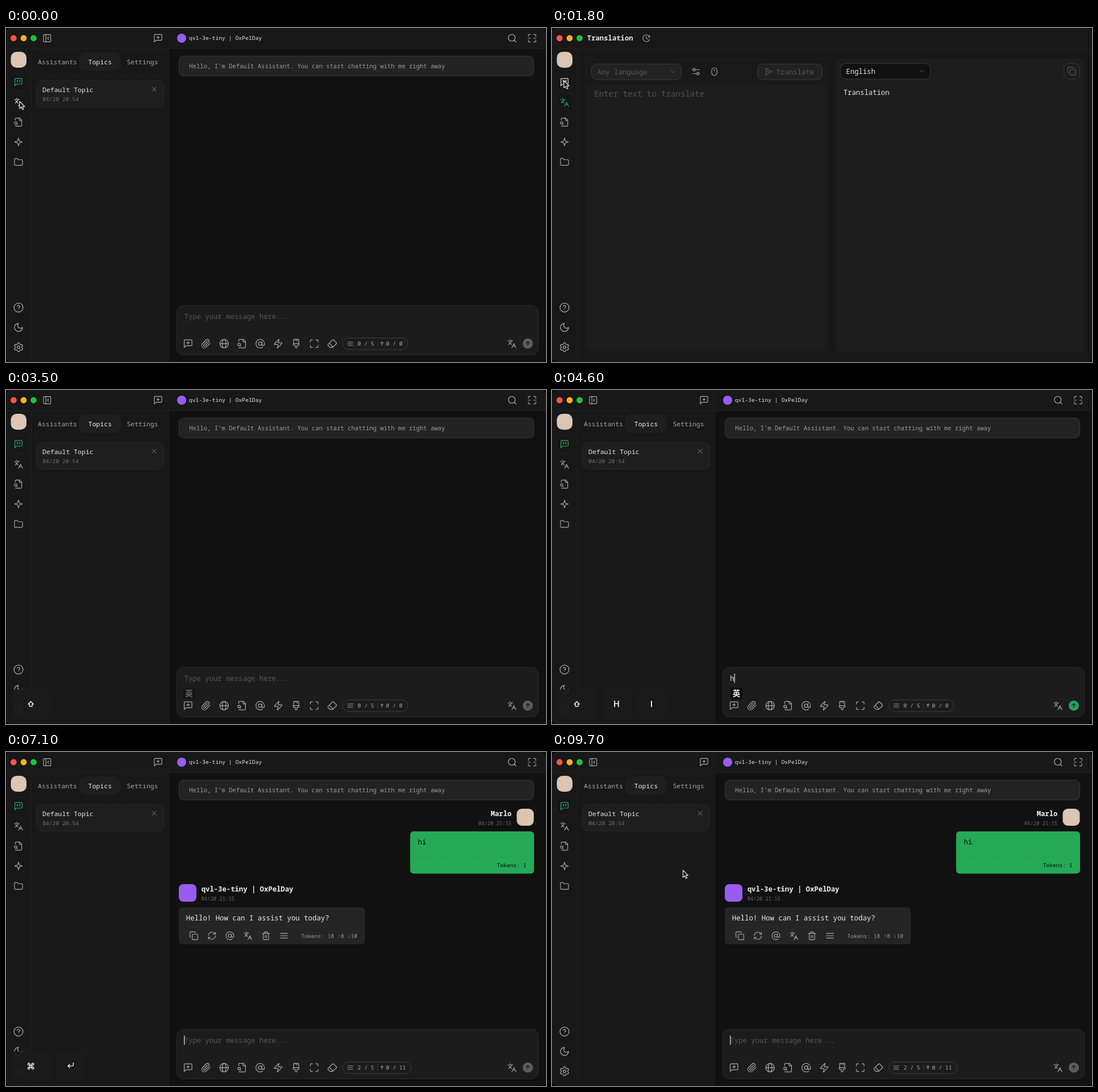
These frames come from a looping animation (950 by 589 pixels, 10000 ms). An HTML page:

```html
<!DOCTYPE html>
<html lang="en">
<head>
<meta charset="utf-8">
<title>Chat demo</title>
<style>
html, body { margin: 0; width: 100%; height: 100%; overflow: hidden; background: #0c0b0a; }
svg { display: block; width: 100vw; height: 100vh; }
text { font-family: "Noto Sans Mono", "DejaVu Sans Mono", monospace; white-space: pre; }
.key { font-family: Inter, Roboto, sans-serif; font-weight: 600; }
.cjk { font-family: "Noto Sans CJK SC", "Noto Sans CJK", sans-serif; font-weight: 700; }
</style>
</head>
<body>
<svg id="stage" viewBox="0 0 950 589" xmlns="http://www.w3.org/2000/svg"></svg>
<script>
const LOOP = 10000;
const MODEL = 'qvl-3e-tiny | OxPelDay';
const USER = 'Marlo';
const REPLY = ['Hello', '!', ' How', ' can', ' I', ' assist', ' you', ' today', '?'];
const GREEN = '#22b862', GREY = '#aaa', PURPLE = '#9a5cf0', SKIN = '#dcc5b3';

// Event times in ms
const AT = {
  translate: 100, chat: 2000, shift: 3000, badge: 3500, h: 4200, keyI: 4500, i: 4700,
  count: 4900, badgeOff: 5000, cmd: 5300, enter: 5400, send: 5500,
  reply: 6400, done: 7100, keysOff: 7600, mouse: 8600
};

const circle = (x, y, r) => `M${x - r} ${y}a${r} ${r} 0 1 1 ${2 * r} 0a${r} ${r} 0 1 1 ${-2 * r} 0`;

function gear() {
  let d = '';
  for (let a = 0; a < 360; a += 6) {
    const th = a * Math.PI / 180;
    const lobe = Math.max(-1, Math.min(1, 1.6 * Math.cos(6 * th)));
    const r = 8.6 - 1.3 * lobe;
    d += (a ? 'L' : 'M') + (12 + r * Math.cos(th)).toFixed(2) + ' ' + (12 + r * Math.sin(th)).toFixed(2);
  }
  return d + 'Z' + circle(12, 12, 3);
}

const bubble = 'M21 15a2 2 0 0 1-2 2H7l-4 4V5a2 2 0 0 1 2-2h14a2 2 0 0 1 2 2z';
const corners = 'M8 3H5a2 2 0 0 0-2 2v3M21 8V5a2 2 0 0 0-2-2h-3M3 16v3a2 2 0 0 0 2 2h3M16 21h3a2 2 0 0 0 2-2v-3';

// Line icons on a 24 unit grid
const ICONS = {
  quote: bubble + 'M8 12a2 2 0 0 0 2-2V8H8M14 12a2 2 0 0 0 2-2V8h-2',
  add: bubble + 'M12 7v6M9 10h6',
  lang: 'M5 8l6 6M4 14l6-6 2-3M2 5h12M7 2h1M22 22l-5-10-5 10M14 18h6',
  file: 'M14 2v4a2 2 0 0 0 2 2h4M4.3 21a2 2 0 0 0 1.7 1h12a2 2 0 0 0 2-2V7l-5-5H6a2 2 0 0 0-2 2v3M9 18l-1.5-1.5' + circle(5, 14, 3),
  spark: 'M12 2.5 14 9q.3.8 1 1l6.5 2-6.5 2q-.8.3-1 1l-2 6.5-2-6.5q-.3-.8-1-1l-6.5-2 6.5-2q.8-.3 1-1z',
  folder: 'M20 20a2 2 0 0 0 2-2V8a2 2 0 0 0-2-2h-7.9a2 2 0 0 1-1.7-.9l-.8-1.2A2 2 0 0 0 7.9 3H4a2 2 0 0 0-2 2v13a2 2 0 0 0 2 2z',
  help: circle(12, 12, 10) + 'M9 9a3 3 0 0 1 5.8 1c0 2-3 3-3 3M12 17h.01',
  moon: 'M12 3a6 6 0 0 0 9 9 9 9 0 1 1-9-9z',
  gear: gear(),
  panel: 'M5 3h14a2 2 0 0 1 2 2v14a2 2 0 0 1-2 2H5a2 2 0 0 1-2-2V5a2 2 0 0 1 2-2zM9 3v18M16 15l-3-3 3-3',
  search: circle(11, 11, 8) + 'M21 21l-4.3-4.3',
  wide: corners + 'M3 12h5M16 12h5',
  full: corners,
  clip: 'M21.4 11l-9.2 9.2a6 6 0 0 1-8.5-8.5l8.6-8.6A4 4 0 1 1 18 8.8l-8.6 8.6a2 2 0 0 1-2.8-2.8l8.5-8.5',
  globe: circle(12, 12, 10) + 'M2 12h20M12 2a4.4 10 0 0 0 0 20a4.4 10 0 0 0 0-20',
  at: circle(12, 12, 4) + 'M16 8v5a3 3 0 0 0 6 0v-1a10 10 0 1 0-4 8',
  zap: 'M4 14a1 1 0 0 1-.8-1.6l9.9-10.2a.5.5 0 0 1 .9.5l-2 6a1 1 0 0 0 1 1.3h7a1 1 0 0 1 .8 1.6l-9.9 10.2a.5.5 0 0 1-.9-.5l2-6a1 1 0 0 0-1-1.3z',
  brush: 'M10 2v2M14 2v4M17 2a1 1 0 0 1 1 1v9H6V3a1 1 0 0 1 1-1zM6 12a1 1 0 0 0-1 1v1a2 2 0 0 0 2 2h2a1 1 0 0 1 1 1v3a2 2 0 1 0 4 0v-3a1 1 0 0 1 1-1h2a2 2 0 0 0 2-2v-1a1 1 0 0 0-1-1',
  eraser: 'M7 21l-4.3-4.3c-1-1-1-2.5 0-3.4l9.6-9.6c1-1 2.5-1 3.4 0l5.6 5.6c1 1 1 2.5 0 3.4L13 21zM5 11l9 9',
  copy: 'M10 8h10a2 2 0 0 1 2 2v10a2 2 0 0 1-2 2H10a2 2 0 0 1-2-2V10a2 2 0 0 1 2-2zM4 16a2 2 0 0 1-2-2V4a2 2 0 0 1 2-2h10a2 2 0 0 1 2 2',
  refresh: 'M3 12a9 9 0 0 1 15-6.7L21 8M21 3v5h-5M21 12a9 9 0 0 1-15 6.7L3 16M3 21v-5h5',
  sync: 'M6 17.5A8 8 0 0 1 13 4M10.5 1.5 13.2 4l-2.7 2.8M18 6.5A8 8 0 0 1 11 20M13.5 17l-2.7 3 2.7 2.5',
  trash: 'M3 6h18M19 6v14a2 2 0 0 1-2 2H7a2 2 0 0 1-2-2V6M8 6V4a2 2 0 0 1 2-2h4a2 2 0 0 1 2 2v2M10 11v6M14 11v6',
  menu: 'M3 6h18M3 12h18M3 18h18',
  up: 'M12 19V5M6 11l6-6 6 6',
  close: 'M5 5l14 14M19 5L5 19',
  down: 'M5 8l7 8 7-8',
  history: 'M19.5 7.5A8.7 8.7 0 1 0 20 15.5M20.5 5.5v4h-3.5M12 7v5.5l4 2',
  sliders: 'M20 7h-9M14 17H5' + circle(17, 17, 3) + circle(7, 7, 3),
  mouse: 'M12 2a7 7 0 0 1 7 7v6a7 7 0 0 1-14 0V9a7 7 0 0 1 7-7zM12 6v4',
  plane: 'M4 3l17 9-17 9 3-9zM7 12h6',
  shift: 'M12 4l8 8h-4v7H8v-7H4z',
  cmd: 'M9 9h6v6H9zM9 9H6a3 3 0 1 1 3-3zM15 9V6a3 3 0 1 1 3 3zM15 15h3a3 3 0 1 1-3 3zM9 15v3a3 3 0 1 1-3-3z',
  enter: 'M20 5v6a3 3 0 0 1-3 3H4M9 9l-5 5 5 5'
};

const icon = (name, x, y, size = 18, color = GREY, w = 1.6, id = '') =>
  `<path ${id && `id="${id}"`} d="${ICONS[name]}" transform="translate(${x} ${y}) scale(${size / 24}) translate(-12 -12)"
    fill="none" stroke="${color}" stroke-width="${w}" stroke-linecap="round" stroke-linejoin="round"/>`;

// y is the middle of the capitals
const text = (x, y, size, color, str, more = '') =>
  `<text x="${x}" y="${(y + size * .357).toFixed(2)}" font-size="${size}" fill="${color}" ${more}>${str}</text>`;

const box = (x, y, x2, y2, r, fill, stroke = 'none', more = '') =>
  `<rect x="${x}" y="${y}" width="${x2 - x}" height="${y2 - y}" rx="${r}" fill="${fill}" stroke="${stroke}" ${more}/>`;

const line = (d, color, more = '') => `<path d="${d}" fill="none" stroke="${color}" ${more}/>`;
const dot = (x, y, r, fill, more = '') => `<circle cx="${x}" cy="${y}" r="${r}" fill="${fill}" ${more}/>`;
const group = (id, body) => `<g id="${id}">${body}</g>`;
const bold = 'font-weight="700"', medium = 'font-weight="500"';
const end = 'text-anchor="end"', mid = 'text-anchor="middle"';
const dash = 'stroke-dasharray="2 2"';

const nav = [['quote', 95.5], ['lang', 131], ['file', 166], ['spark', 201], ['folder', 236.5]];

const frame =
  box(0, 0, 950, 589, 9, '#181818') +
  line('M44.5 36V589', '#202020');

const sidebar =
  dot(13.3, 18, 5.4, '#ff5147') + dot(31, 18, 5.4, '#fdb024') + dot(48.5, 18, 5.4, '#20c43c') +
  box(8.5, 42, 36, 70, 10, SKIN) +
  box(7.5, 116, 37, 146, 8, '#161616', '#1f1f1f', 'id="navbox"') +
  nav.map(([name, y], i) => icon(name, 22, y, 17, GREY, 1.6, 'nav' + i)).join('') +
  icon('help', 22, 493, 19) + icon('moon', 22, 528, 19) + icon('gear', 22, 563, 19);

const tools = ['add', 'clip', 'globe', 'file', 'at', 'zap', 'brush', 'full', 'eraser']
  .map((name, i) => icon(name, 320.3 + i * 31.7, 556.7, 18)).join('');

const chat =
  '<path d="M287 36H950V580a9 9 0 0 1-9 9H287z" fill="#111"/>' +
  line('M0 36.5H950', '#1f1f1f') + line('M286.5 0V589', '#1d1d1d') +
  icon('panel', 72.3, 18, 17) + icon('add', 267.5, 18, 17.5) +
  dot(309, 18, 8, PURPLE) + text(321.8, 18, 9.72, '#e4e4e4', MODEL) +
  icon('search', 890.5, 18, 18) + icon('wide', 925.5, 18, 17.5) +
  text(56, 60, 11.5, '#a5a5a5', 'Assistants') +
  box(129.5, 44, 201, 74.5, 10, '#1e1e1e', '#242424') +
  text(144.8, 60, 11.5, '#f0f0f0', 'Topics', medium) +
  text(212.4, 60, 11.5, '#a5a5a5', 'Settings') +
  line('M53 84H278', '#202020', dash) +
  box(53.5, 92.5, 278, 139.5, 10, '#1e1e1e', '#262626') +
  text(64, 108.5, 11.5, '#e6e6e6', 'Default Topic') +
  text(64.2, 125.5, 9.7, '#6c6c6c', '04/20 20:54') +
  icon('close', 260.7, 108, 13, '#8a8a8a') +
  box(304.5, 49.5, 928.5, 84.5, 8, '#232323', '#353535') +
  text(322.3, 67.5, 10.57, '#9c9c9c', "Hello, I'm Default Assistant. You can start chatting with me right away") +
  box(300, 489, 937, 576.5, 12, '#1c1c1c', '#272727') +
  text(313.5, 509, 12.25, '#565656', 'Type your message here...', 'id="hint"') +
  text(313.2, 509, 12.25, '#e8e8e8', '', 'id="typed"') +
  box(0, 500, 1.2, 516.5, 0, '#e8e8e8', 'none', 'id="caret"') +
  tools +
  box(592.5, 546.5, 707, 567, 10.2, 'none', '#3c3c3c', 'id="pill"') +
  icon('menu', 605.7, 556.7, 12, GREY) + line('M653.5 550.5v12', '#333') + icon('up', 661.5, 556.5, 10.5, GREY, 2.2) +
  text(618.5, 557, 9.72, GREY, '', 'id="ctx"') + text(668.5, 557, 9.72, GREY, '', 'id="tok"') +
  icon('lang', 890, 556.7, 17) +
  group('send', dot(918, 556.5, 9, '#5c5c5c', 'id="sendDot"') + icon('up', 918, 556.5, 12, '#1a1a1a', 2.4)) +
  group('pause', dot(918, 556.5, 8.8, 'none', 'stroke="#e8392b" stroke-width="1.7"') +
    line('M916 552.8v7.4M920.2 552.8v7.4', '#e8392b', 'stroke-width="1.7"')) +
  group('badge', box(-10.5, 525, 10.5, 545.5, 4, '#0b0b0b') + text(0, 534.8, 13.5, '#f2f2f2', '英', mid + ' class="cjk"'));

const log =
  text(889.4, 108.5, 12.25, '#f0f0f0', USER, bold + ' ' + end) +
  text(889.3, 125.5, 8.85, '#666', '04/20 21:15', end) +
  box(898.5, 100, 928.5, 130, 9, SKIN) +
  box(711, 140, 929, 214.5, 6, '#24a957') +
  text(724.5, 159, 12.35, '#0c0c0c', 'hi', medium) +
  line('M725 184H915', '#219d50', dash) +
  text(915.5, 199.5, 9.6, '#0c0c0c', 'Tokens: 1', end) +
  box(304, 233, 335, 264, 8, PURPLE) +
  text(343.7, 242, 12.25, '#f0f0f0', MODEL, bold) +
  text(343.5, 259, 8.85, '#666', '04/20 21:15') +
  box(304, 274, 343, 310.5, 6, '#252525', 'none', 'id="answer"') +
  `<g id="loader">${icon('sync', 0, 0, 16, '#e0e0e0', 1.8)}</g>` +
  text(316.8, 292.7, 12.35, '#ececec', '', medium + ' id="reply"') +
  group('actions', line('M317 308.5H618', '#2e2e2e', dash) +
    ['copy', 'refresh', 'at', 'lang', 'trash', 'menu']
      .map((name, i) => icon(name, 330.5 + i * 31.7, 324, 16.5)).join('') +
    text(519.3, 324.3, 9.7, '#999', 'Tokens: 18 ↑8 ↓10'));

const translation =
  line('M0 36.5H950', '#1f1f1f') +
  text(61.8, 18, 12.25, '#e8e8e8', 'Translation', bold) + icon('history', 166, 18, 16.5) +
  box(60, 54.5, 484.5, 571, 8, '#191919', '#1f1f1f') + box(62, 100, 482, 567, 8, '#1d1d1d') +
  box(69.5, 63.5, 227.5, 91, 9, '#222', '#3a3a3a') +
  text(79.7, 77.5, 12.25, '#585858', 'Any language') + icon('down', 213, 77, 13, '#585858') +
  icon('sliders', 253.3, 77, 17) + icon('mouse', 285.7, 77, 16) +
  box(361.5, 63.5, 475.5, 91, 9, '#222', '#3a3a3a') +
  icon('plane', 381, 77, 16, '#585858') + text(394.7, 77.5, 12.25, '#585858', 'Translate') +
  text(74.3, 115.5, 14.05, '#505050', 'Enter text to translate') +
  box(499, 54, 937, 571.5, 8, '#1d1d1d') +
  box(507.5, 62.5, 665.5, 90, 9, '#111', '#363636') +
  text(517.3, 76.5, 12.25, '#e4e4e4', 'English') + icon('down', 650.5, 76, 13, '#666') +
  box(900.5, 62.5, 928, 90, 9, 'none', '#363636') + icon('copy', 914.2, 76, 16.5, '#585858') +
  text(512.7, 113.5, 12.25, '#e8e8e8', 'Translation');

const keyPad = (x, x2) => box(x, 528, x2, 580, 6, '#1a1a1a', 'none', 'fill-opacity=".93"');
const keyIcon = (name, x, y) => icon(name, x, y, 14, '#f2f2f2', 2.4);
const keys =
  group('pad1', keyPad(10, 78) + group('kShift', keyIcon('shift', 43.7, 554)) + group('kCmd', keyIcon('cmd', 43.7, 554))) +
  group('pad2', keyPad(88, 140) + group('kH', text(113.5, 554, 14, '#f2f2f2', 'H', mid + ' class="key"')) +
    group('kEnter', keyIcon('enter', 113.7, 552.5))) +
  group('pad3', keyPad(150, 201) + text(175, 554, 14, '#f2f2f2', 'I', mid + ' class="key"'));

const pointer = `<path id="mouse" d="M0 0V12.6l2.9-2.7 2 4.5 2.1-.9-2-4.4h4z" fill="#0a0a0a" stroke="#f4f4f4" stroke-width="1.1" stroke-linejoin="round"/>`;

const $ = id => document.getElementById(id);
$('stage').innerHTML = frame + group('chat', chat + group('log', log)) + group('translation', translation) +
  sidebar + group('keys', keys) + pointer;

const show = (id, on) => $(id).setAttribute('display', on ? 'inline' : 'none');
const set = (id, name, value) => $(id).setAttribute(name, value);
const put = (id, str) => { if ($(id).textContent !== str) $(id).textContent = str; };
const within = (t, a, b) => t >= a && t < b;

// Pointer stops: time, x, y
const path = [
  [0, 24, 129.5], [300, 24, 129.5], [900, 22, 167], [1300, 22, 167], [1700, 21, 93], [2000, 21, 93],
  [2250, 370.7, 461], [2500, 370.7, 461], [2700, 376, 465], [AT.mouse, 376, 465], [9400, 230.5, 208.5]
];

function pointerAt(t) {
  const i = path.findIndex(p => p[0] > t);
  if (i < 0) return path[path.length - 1].slice(1);
  const [t0, x0, y0] = path[i - 1], [t1, x1, y1] = path[i];
  const u = (t - t0) / (t1 - t0), k = u * u * (3 - 2 * u);
  return [x0 + (x1 - x0) * k, y0 + (y1 - y0) * k];
}

function caretOn(t) {
  if (t < AT.chat) return false;
  if (t < AT.h) return (t - AT.chat) % 1000 < 500;
  if (t < 5700) return true;
  return (t - 5700) % 1000 < 500;
}

function drawNav(t, inChat, [x, y]) {
  const active = inChat ? 0 : 1;
  const visible = t < AT.shift || t >= AT.mouse;
  nav.forEach(([, cy], i) => {
    const hover = visible && x < 44 && Math.abs(y + 2 - cy) < 14;
    set('nav' + i, 'stroke', i === active ? GREEN : hover ? '#e4e4e4' : GREY);
  });
  set('navbox', 'y', nav[active][1] - 15);
  show('mouse', visible);
  set('mouse', 'transform', `translate(${x.toFixed(2)} ${y.toFixed(2)})`);
}

function drawInput(t) {
  const typed = within(t, AT.h, AT.send) ? (t < AT.i ? 'h' : 'hi') : '';
  const sent = t >= AT.send, done = t >= AT.done;
  put('typed', typed);
  show('hint', !typed);
  show('caret', caretOn(t));
  set('caret', 'x', 313.2 + typed.length * 7.35);
  show('badge', within(t, AT.badge, AT.badgeOff));
  set('badge', 'transform', `translate(${typed ? 324.6 : 322} 0)`);
  set('badge', 'opacity', Math.max(0, Math.min(1, (t - AT.badge + 100) / 300)));
  put('ctx', sent ? '2 / 5' : '0 / 5');
  put('tok', done ? '0 / 11' : t >= AT.count ? '1 / 1' : '0 / 0');
  set('pill', 'width', done ? 120.3 : 114.5);
  const busy = sent && !done;
  show('pause', busy);
  show('send', !busy);
  set('sendDot', 'fill', typed ? '#27a064' : '#5c5c5c');
}

function drawLog(t) {
  show('log', t >= AT.send);
  const done = t >= AT.done, waiting = t < AT.reply;
  const count = Math.max(0, Math.floor((t - AT.reply) / 60) + 1);
  const words = REPLY.slice(0, count).join('');
  put('reply', words);
  show('loader', waiting);
  set('loader', 'transform', `translate(323.5 292.2) rotate(${(t - 5700) * .36})`);
  show('actions', done);
  set('answer', 'width', done ? 327.5 : waiting ? 39 : 26 + words.length * 7.41);
  set('answer', 'height', done ? 65 : 36.5);
}

function drawKeys(t) {
  const second = t >= AT.cmd;
  show('keys', within(t, AT.shift, AT.keysOff));
  set('pad1', 'opacity', Math.max(0, Math.min(1, (t - AT.shift + 150) / 450)));
  show('kShift', !second);
  show('kCmd', second);
  show('pad2', within(t, AT.h, AT.cmd) || t >= AT.enter);
  show('kH', !second);
  show('kEnter', second);
  show('pad3', within(t, AT.keyI, AT.cmd));
}

function draw(t) {
  const inChat = !within(t, AT.translate, AT.chat);
  show('chat', inChat);
  show('translation', !inChat);
  drawNav(t, inChat, pointerAt(t));
  drawInput(t);
  drawLog(t);
  drawKeys(t);
}

const start = performance.now();
function tick() {
  draw((performance.now() - start) % LOOP);
  requestAnimationFrame(tick);
}
tick();
</script>
</body>
</html>
```
